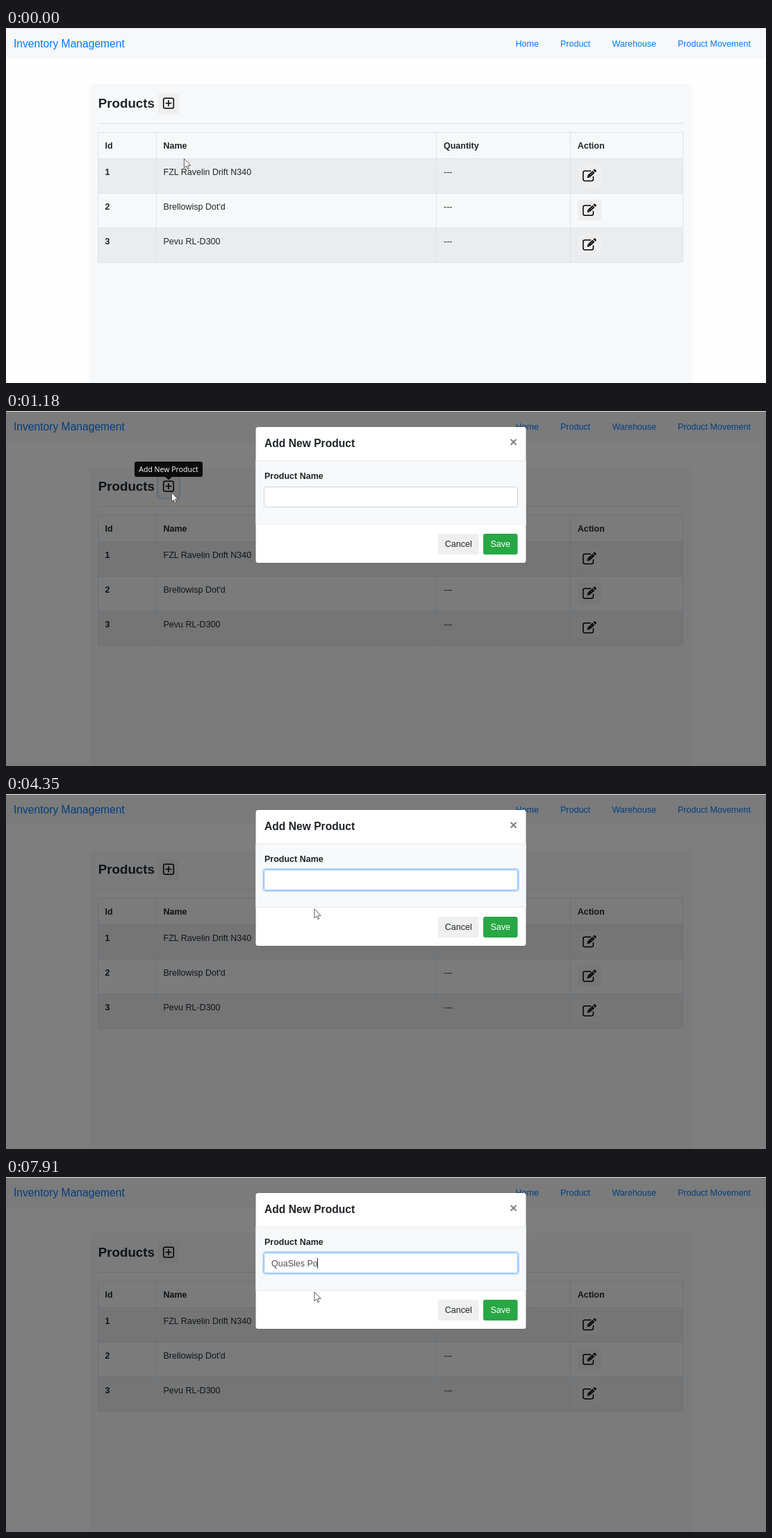
Recreate the animation shown at these times as an HTML page. Size 1094 by 512 pixels, loop 8000 ms.

```html
<!DOCTYPE html>
<html lang="en">
<head>
<meta charset="utf-8">
<title>Inventory Management</title>
<style>
  html, body { margin: 0; width: 100%; height: 100%; overflow: hidden; background: #fefefe; }
  svg { display: block; width: 1094px; height: 512px; }
  text { font: 12.5px "Liberation Sans", Arial, sans-serif; fill: #212529; }
  .bold { font-weight: bold; }
  .link { fill: #007bff; }
  .line { fill: none; stroke: #dee2e6; }
  .panel { fill: #f7f8fa; }
  .button { fill: #efefef; }
  .icon { fill: none; stroke: #000; stroke-width: 1.5; }
  .ring { fill: none; stroke: #007bff; stroke-opacity: .25; stroke-width: 2; }
  .pointer { fill: #fff; stroke: #333; stroke-width: .8; stroke-linejoin: round; }
  #tip text { font: 10.57px "Open Sans", "Noto Sans", sans-serif; fill: #fff; }
  #click { fill: #fff566; mix-blend-mode: multiply; }
</style>
</head>
<body>
<svg viewBox="0 0 1094 512">
  <defs>
    <g id="edit">
      <rect class="button" x="823" y="198" width="34" height="30" rx="3"/>
      <path class="icon" d="M842 206.2H833.2a2.4 2.4 0 0 0-2.4 2.4V218a2.4 2.4 0 0 0 2.4 2.4H843a2.4 2.4 0 0 0 2.4-2.4V214"/>
      <path d="M836.6 216.2l.8-3.9 6.9-6.4 3 3.2-6.9 6.3zM845.2 205l1.2-1.1q.9-.6 1.7.1l1.4 1.5q.6.9-.1 1.6l-1.2 1.1z"/>
      <path d="M838.2 212.9l1.9 2M840.5 212.4l4.4-4.1" stroke="#efefef" stroke-width=".7"/>
    </g>
  </defs>

  <rect class="panel" width="1094" height="44"/>
  <rect width="1094" height="1" fill="#e0e1e2"/>
  <text class="link" x="11" y="27.7" style="font-size:15.63px">Inventory Management</text>
  <text class="link" x="733.5" y="26.5">Home</text>
  <text class="link" x="798" y="26.5">Product</text>
  <text class="link" x="872.5" y="26.5">Warehouse</text>
  <text class="link" x="967" y="26.5">Product Movement</text>

  <rect class="panel" x="120.5" y="81.5" width="867" height="440" rx="4"/>
  <text class="bold" x="132.7" y="114.7" style="font-size:18.75px">Products</text>
  <rect class="button" x="219" y="94.5" width="30" height="30" rx="3"/>
  <rect class="icon" x="226.7" y="101.2" width="14.6" height="14.6" rx="2.4"/>
  <path class="icon" d="M229.6 108.5h8.8M234 104.1v8.8"/>
  <rect class="ring" id="addRing" x="218" y="93" width="32" height="33" rx="4"/>
  <path class="line" d="M132.5 137.5H975" style="stroke:#e1e2e4"/>

  <g id="rows"></g>
  <path class="line" d="M132.5 150.5H974.5V338H132.5ZM132.5 188.5H974.5M132.5 238.5H974.5M132.5 288.5H974.5M216.5 150.5V338M619.5 150.5V338M812.5 150.5V338"/>
  <text class="bold" x="142.5" y="173.6">Id</text>
  <text class="bold" x="226.5" y="173.6">Name</text>
  <text class="bold" x="630" y="173.6">Quantity</text>
  <text class="bold" x="822.7" y="173.6">Action</text>

  <g id="modal">
    <rect y="1" width="1094" height="511" opacity=".5"/>
    <rect x="359" y="22.5" width="390" height="197" rx="4" opacity=".2"/>
    <rect x="359.5" y="23" width="389" height="196" rx="3.5" fill="#fff"/>
    <rect class="panel" x="359.5" y="71.5" width="389" height="92.5"/>
    <path class="line" d="M359.5 71.5H748.5M359.5 163.5H748.5" style="stroke:#e9ecef"/>
    <text class="bold" x="372" y="52.4" style="font-size:15.63px">Add New Product</text>
    <text class="bold" x="725" y="51" style="font-size:18.75px;fill:#7f7f7f">×</text>
    <text class="bold" x="372" y="97.6">Product Name</text>
    <rect class="ring" id="fieldRing" x="370" y="108" width="368" height="32" rx="4"/>
    <rect id="field" x="371.5" y="109.5" width="365" height="29" rx="3" fill="#fff"/>
    <text id="typed" x="382" y="128.5" xml:space="preserve" style="fill:#495057"></text>
    <rect id="caret" y="117" width="1" height="15" fill="#333"/>
    <rect class="button" x="621.8" y="177" width="59" height="30" rx="3"/>
    <text x="631.8" y="196.2">Cancel</text>
    <rect x="687" y="177" width="49.5" height="30" rx="3" fill="#28a745"/>
    <text x="697.5" y="196.2" style="fill:#fff">Save</text>
  </g>

  <g id="tip">
    <path d="M188 73H280a3 3 0 0 1 3 3V92a3 3 0 0 1-3 3H239l-5 4.6-5-4.6H188a3 3 0 0 1-3-3V76a3 3 0 0 1 3-3Z" opacity=".9"/>
    <text x="234" y="88" text-anchor="middle">Add New Product</text>
  </g>

  <circle id="click" r="9.5"/>
  <g id="cursor">
    <path class="pointer" id="arrow" d="M.4 .6V13.8L3.4 11.1 5.5 15.7 7.4 14.9 5.4 10.4H9.6Z"/>
    <path class="pointer" id="hand" d="M-.8 12V2.2a1.5 1.5 0 0 1 3 0V7.2l4.3 1q1.6.5 1.5 2.2l-.5 4.4-1.3 3.7H0L-4 12.8q-1-2 .6-2.4Z"/>
    <path id="beam" d="M0 1.6H2.8Q4 1.6 4 2.8V14.4Q4 15.6 2.8 15.6H0M8 1.6H5.2Q4 1.6 4 2.8M4 14.4Q4 15.6 5.2 15.6H8" fill="none" stroke="#000" stroke-width="1.2"/>
  </g>
</svg>

<script>
const LOOP = 8000;
const PRODUCTS = ["FZL Ravelin Drift N340", "Brellowisp Dot'd", "Pevu RL-D300"];
const ENTRY = "QuaSles Po";
const KEY_TIMES = [4660, 5060, 5520, 5980, 6280, 6640, 6830, 7220, 7540, 7910];
const MODAL_OPEN = 1180, ADD_CLICK = 940, FIELD_CLICK = 2800;
const START = [256, 188];
const MOVES = [
  { from: 70, to: 395, steps: 5, end: [238, 117] },
  { from: 2040, to: 2270, steps: 4, end: [385, 117] },
  { from: 2954, to: 3340, steps: 6, end: [443.5, 165] }
];

const $ = id => document.getElementById(id);
const set = (id, attrs) => {
  for (const key in attrs) $(id).setAttribute(key, attrs[key]);
};
const show = (id, on) => { $(id).style.display = on ? "" : "none"; };
const within = (t, a, b) => t >= a && t < b;
const ease = p => p * p * (3 - 2 * p);

// Progress in equal jumps: the first at a, the last at b.
function stepped(t, a, b, n) {
  if (t < a) return 0;
  if (t >= b) return 1;
  return (Math.floor((t - a) / (b - a) * (n - 1)) + 1) / n;
}

$("rows").innerHTML = PRODUCTS.map((name, i) => {
  const dy = i * 49.8;
  const y = 212 + dy;
  const stripe = i % 2 ? "" : `<rect x="133" y="${188.5 + dy}" width="842" height="49.8" fill="#ebecee"/>`;
  return `${stripe}<text class="bold" x="142.5" y="${y}">${i + 1}</text>
    <text x="226.5" y="${y}">${name}</text><text x="630" y="${y}">---</text>
    <use href="#edit" y="${dy}"/>`;
}).join("");

function pointerAt(t) {
  return MOVES.reduce((pos, m) => {
    const p = ease(stepped(t, m.from, m.to, m.steps));
    return pos.map((v, i) => v + (m.end[i] - v) * p);
  }, START);
}

function drawPointer(t) {
  const [x, y] = pointerAt(t);
  const hand = y < 125 && t < MODAL_OPEN;
  const beam = x > 372 && y < 139;
  set("cursor", { transform: `translate(${x} ${y})` });
  show("hand", hand);
  show("beam", beam);
  show("arrow", !hand && !beam);

  const adding = within(t, ADD_CLICK, MODAL_OPEN);
  show("click", adding || within(t, FIELD_CLICK, 2954));
  set("click", adding ? { cx: 238, cy: 117 } : { cx: 389, cy: 125 });
}

function drawField(t) {
  const focused = t >= FIELD_CLICK;
  show("fieldRing", focused);
  set("field", { stroke: focused ? "#80bdff" : "#ced4da" });

  const text = ENTRY.slice(0, KEY_TIMES.filter(k => t >= k).length);
  $("typed").textContent = text;
  const width = text ? $("typed").getComputedTextLength() : 0;
  set("caret", { x: Math.floor(382 + width) });
  show("caret", within(t, FIELD_CLICK, 3340) || within(t, 3890, 4350) || t >= KEY_TIMES[0]);
}

function draw(now) {
  const t = now % LOOP;
  show("modal", t >= MODAL_OPEN);
  show("addRing", within(t, ADD_CLICK, FIELD_CLICK));
  const fadeIn = stepped(t, 477, 640, 3);
  const fadeOut = stepped(t, 1255, 1330, 2);
  set("tip", { opacity: fadeIn * (1 - fadeOut) });
  drawField(t);
  drawPointer(t);
  requestAnimationFrame(draw);
}
requestAnimationFrame(draw);
</script>
</body>
</html>
```
